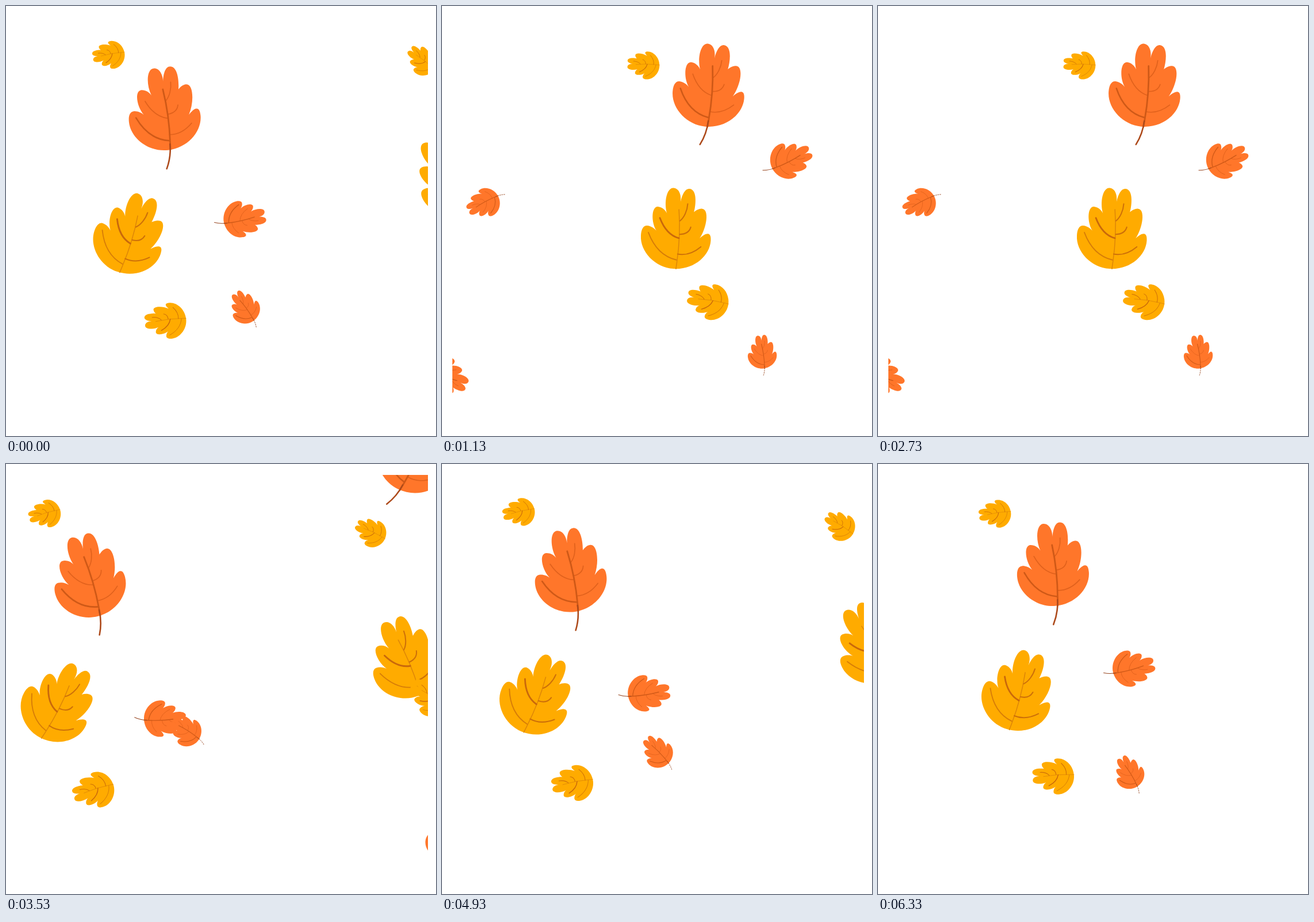
Animation, 748 px wide and 748 px high, one loop 6.41 s. Source, as an HTML page:

```html
<!DOCTYPE html>
<html lang="en">
<head>
<meta charset="utf-8">
<title>Falling leaves</title>
<style>
  html, body { margin: 0; width: 100%; height: 100%; overflow: hidden; background: #fff; }
  svg { display: block; width: 100vw; height: 100vh; }
</style>
</head>
<body>
<svg id="stage" viewBox="0 0 748 748">
  <clipPath id="window"><rect x="18" y="19" width="716" height="714"/></clipPath>
  <g id="leaves" clip-path="url(#window)"></g>
</svg>
<script>
const LOOP = 6410, PERIOD = 1600, LEAD = 70;
const ORANGE = '#ff762a', YELLOW = '#ffab00';

// Leaf drawn upright with the foot of the blade at 0,0.
const BLADE = `M-3 0C-36 0-65-27-65-56C-65-68-61-74-55-74C-48-74-42-70-38-66
  C-48-80-50-108-38-109C-31-109-24-104-21-98C-28-118-24-144-12-144
  C-2-144 3-132 2-120C4-133 9-145 17-144C30-143 30-118 27-103
  C31-107 36-110 41-110C54-110 52-78 40-57C45-62 50-66 54-66
  C59-66 60-60 60-54C60-27 33 0-3 0Z`;
const VEINS = {
  lowLeft: 'M-52-62C-40-35-22-20 1-16',
  midLeft: 'M-33-89Q-20-60 3-55',
  topRight: 'M15-117C15-105 10-92 3-86',
  midRight: 'M23-76Q20-63 4-62',
  lowRight: 'M43-42Q24-24 2.5-26.5',
  rib: 'M0-106Q6-60 2-12L1 0',
  stem: 'M1.5-10Q1 12-9 32'
};

const line = (name, color, width, dash = '') =>
  `<path d="${VEINS[name]}" fill="none" stroke="${color}" stroke-width="${width}"
    stroke-linecap="round" stroke-dasharray="${dash}"/>`;
const blade = color => `<path d="${BLADE}" fill="${color}"/>`;

const orangeLeaf = stem => blade(ORANGE)
  + ['midLeft', 'topRight', 'midRight', 'lowRight'].map(v => line(v, '#e0611c', 1.7)).join('')
  + line('lowLeft', '#cf5917', 2.6) + line('rib', '#cf5917', 2.8) + stem;
const yellowLeaf = blade(YELLOW)
  + line('rib', '#dc8508', 1.5) + line('lowLeft', '#d67c08', 1.9)
  + ['topRight', 'midRight', 'lowRight'].map(v => line(v, '#cd7009', 2.1)).join('')
  + line('midLeft', '#c9680b', 2.9);

// via: waypoints half a period apart; angle: degrees, with s counted in waypoints.
const LEAVES = [
  { art: orangeLeaf(line('stem', '#ad4a1b', 2.6)), size: 1, angle: s => 36 - 20.4 * s,
    via: [[759, -115], [608.5, 71], [303, 175], [1, 230], [-148, 560]] },
  { art: yellowLeaf, size: .975, angle: s => 25 * s - 34,
    via: [[783, 283], [562.5, 372], [244.5, 394], [-27.5, 477], [-66, 905]] },
  { art: yellowLeaf, size: .387, angle: s => 4 * s * s - 32.8 * s - 48,
    via: [[738, 85], [498.6, 119], [203.5, 87.5], [-52, 119], [-240, 330]] },
  { art: orangeLeaf(line('stem', '#96451f', 2)), size: .507, angle: s => 28 + 24.2 * s,
    via: [[815, -120], [740, 168], [444.5, 354], [125, 538.5], [-48, 757]] },
  { art: orangeLeaf(line('stem', '#96451f', 2.2, '4 5')), size: .403, angle: s => 45 - 26 * s - 5.8 * s * s,
    via: [[817, 615], [666.5, 646], [435.5, 536.5], [189, 395.5], [-38, 322]] },
  { art: yellowLeaf, size: .5, angle: s => -41 - 26 * s,
    via: [[833, 325], [610, 468.5], [305, 544], [23, 604], [-77, 800]] }
];

// Neville's scheme: one smooth curve through all waypoints, the i-th at s = i.
function pointOn(via, s) {
  let row = via;
  for (let span = 1; span < via.length; span++) {
    row = row.slice(1).map((next, i) =>
      next.map((v, axis) => row[i][axis] + (v - row[i][axis]) * (s - i) / span));
  }
  return row[0];
}

// Each leaf outlives one period, so two generations share the screen.
const layer = document.getElementById('leaves');
const sprites = LEAVES.flatMap(leaf => [0, PERIOD].map(delay => {
  const node = document.createElementNS('http://www.w3.org/2000/svg', 'g');
  node.innerHTML = leaf.art;
  layer.append(node);
  return { leaf, delay, node };
}));

// Pictures hold for 30 and 70 ms in turn.
function heldTime(ms) {
  const t = Math.min(ms % LOOP, LOOP - 11);
  const rest = t % 100;
  return t - rest + (rest < 30 ? 0 : 30);
}

function draw(ms) {
  const phase = heldTime(ms) % PERIOD;
  for (const { leaf, delay, node } of sprites) {
    const s = (phase + delay + LEAD) / (PERIOD / 2);
    const [x, y] = pointOn(leaf.via, s);
    node.setAttribute('transform',
      `translate(${x} ${y}) rotate(${leaf.angle(s)}) scale(${leaf.size}) translate(2.5 72)`);
  }
}

const began = performance.now();
function tick() {
  draw(performance.now() - began);
  requestAnimationFrame(tick);
}
tick();
</script>
</body>
</html>
```
